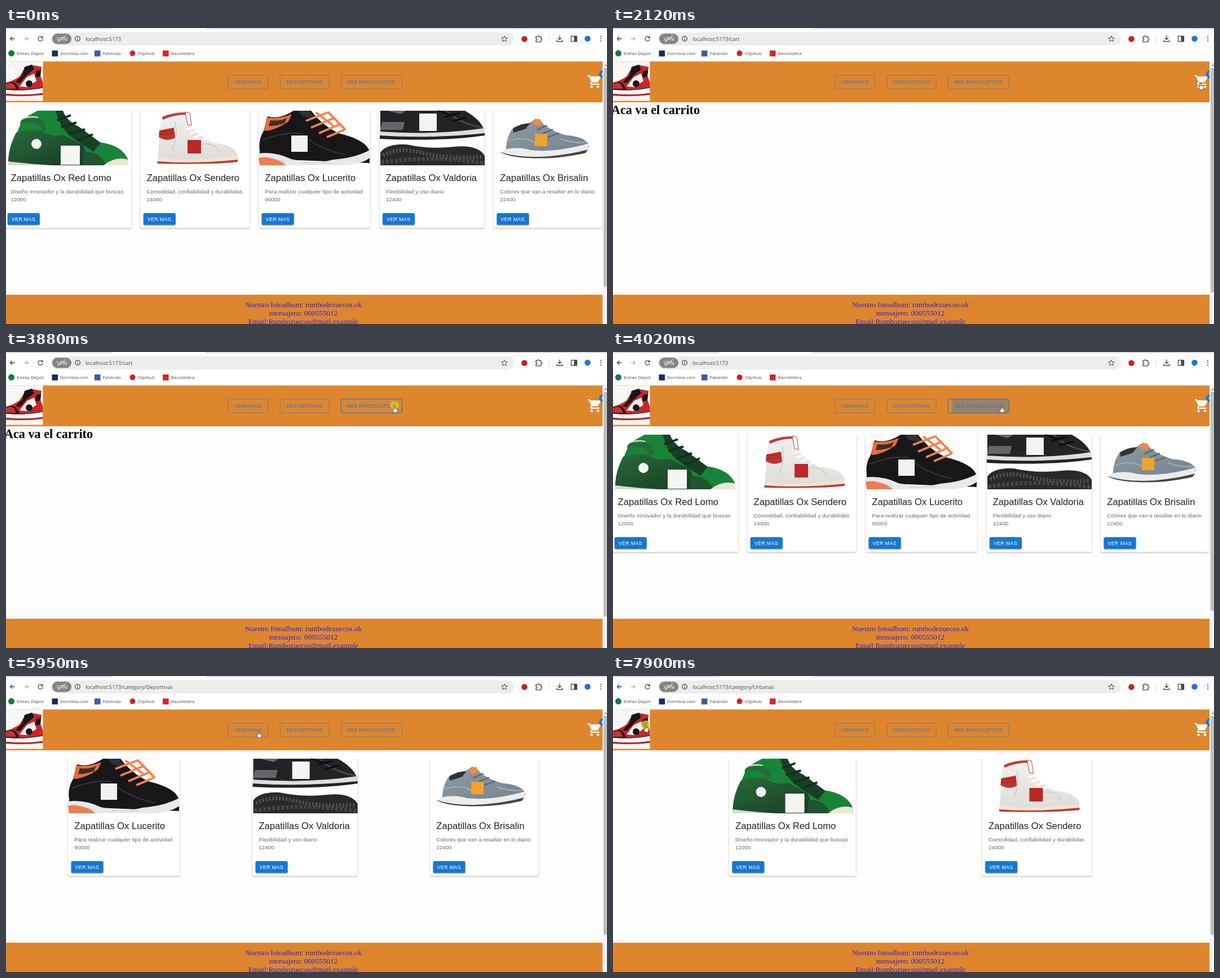
An HTML page that plays this animation: 1066 by 526 pixels, repeating every 8 s.

```html
<!DOCTYPE html>
<html lang="es">
<head>
<meta charset="utf-8">
<title>Tienda de zapatillas</title>
<style>
html, body { margin: 0; width: 100%; height: 100%; overflow: hidden; background: #fff; }
svg { display: block; width: 100vw; height: 100vh; }
text { white-space: pre; }
.chrome { font-family: "Open Sans", "Noto Sans", sans-serif; fill: #45484c; }
.url { font-size: 9.4px; }
.marks { font-size: 8px; }
.page { font-family: "Liberation Sans", Arial, sans-serif; }
.serif { font-family: "Liberation Serif", Times, serif; }
.title { font-size: 16.64px; fill: #212121; }
.body { font-size: 9.7px; letter-spacing: .0107em; fill: #666; }
.more { font-size: 9px; letter-spacing: .0286em; fill: #fff; }
.nav { font-size: 9.7px; letter-spacing: .0286em; fill: #2677df; }
.card { filter: drop-shadow(0 1px .8px rgba(0,0,0,.32)); }
.raised { filter: drop-shadow(0 1px 1px rgba(0,0,0,.35)); }
.line { fill: none; stroke: #45484c; stroke-width: 1.3; }
</style>
</head>
<body>
<svg viewBox="0 0 1066 526" preserveAspectRatio="none">
  <defs>
    <clipPath id="photo"><rect x="-3" y="146.500" width="1070" height="97.500"/></clipPath>
    <clipPath id="view"><rect y="59" width="1058.500" height="467"/></clipPath>
    <clipPath id="logoBox"><rect y="59.500" width="65.500" height="70"/></clipPath>
    <pattern id="checker" width="6" height="6" patternUnits="userSpaceOnUse">
      <rect width="6" height="6" fill="#fff"/><path d="M0 0h3v3H0zM3 3h3v3H3z" fill="#f1f1f1"/>
    </pattern>
    <linearGradient id="suede" x2="1" y2="1"><stop stop-color="#2b6a3d"/><stop offset="1" stop-color="#153b22"/></linearGradient>
    <linearGradient id="leather" x2="0" y2="1"><stop stop-color="#f2f1ef"/><stop offset="1" stop-color="#dedcd8"/></linearGradient>
    <linearGradient id="mesh" x2="1" y2="1"><stop stop-color="#8d9aa3"/><stop offset="1" stop-color="#74838e"/></linearGradient>

    <g id="shoe0">
      <path d="M29 163Q42 154 56 147H101Q107 165 130 176L165 203Q207 208 217 235V244H4Q3 214 19 187Z" fill="#188437"/>
      <path d="M18 186Q42 179 63 183Q80 195 102 190L137 208L150 244H4Q3 214 18 186Z" fill="url(#suede)"/>
      <path d="M88 147H101Q107 165 130 176L168 204L155 220L119 196Q96 180 88 147Z" fill="#183f25"/>
      <path d="M138 221Q165 217 178 244H136Z" fill="#20552f"/>
      <path d="M28 163L55 160L68 166L72 181L64 183Q61 164 24 170Z" fill="#246b38"/>
      <path d="M28 161Q44 156 57 159" fill="none" stroke="#d7e3d9" stroke-width="2"/>
      <path d="M91 164l24-9M98 176l27-8M112 189l28-9M126 200l28-11" stroke="#102f1c" stroke-width="4"/>
      <path d="M173 244Q194 227 217 234V244Z" fill="#ece6d2"/>
      <path d="M4 237Q45 242 82 244H3Z" fill="#ddd9c9"/>
      <circle cx="54" cy="206" r="9" fill="#f3f5f3"/>
      <rect x="97" y="209" width="34" height="34" fill="#f5f5f2"/>
    </g>
    <g id="shoe1">
      <path d="M275 159Q298 149 324 149L331 178Q350 196 366 204Q404 207 411 225L409 238H269L272 195Z" fill="url(#leather)"/>
      <path d="M272 182L298 177L300 195Q286 203 271 194Z" fill="#bd342f"/>
      <path d="M273 185l25-3M272 190l27-3" stroke="#8e211e"/>
      <path d="M277 158Q298 149 319 150L320 154Q298 154 278 163Z" fill="#c63b32"/>
      <path d="M318 149L326 151L329 173L322 172Z" fill="#fff" stroke="#c7403a"/>
      <path d="M319 181l12-5M325 188l16-6M333 195l17-7M343 201l18-6" stroke="#fff" stroke-width="2.500"/>
      <path d="M300 167Q306 195 294 216M348 207Q371 202 379 222" fill="none" stroke="#bdb9b5"/>
      <path d="M269 230Q336 239 411 226V236Q370 242 269 239Z" fill="#efe4d4"/>
      <path d="M268 237Q335 242 411 234V238Q370 243 269 241Z" fill="#bd3b31"/>
      <rect x="322" y="199" width="24" height="24" fill="#bc2825"/>
    </g>
    <g id="shoe2">
      <path d="M450 219Q447 199 457 183L464 157Q486 163 510 147H541Q561 173 590 187Q640 199 645 220V240L449 232Z" fill="#171719"/>
      <path d="M462 159Q485 162 507 153L501 166Q479 182 458 183Z" fill="#e96b38"/>
      <path d="M469 164Q485 166 498 160L494 169Q478 175 466 174Z" fill="#38302f"/>
      <path d="M518 147H538L549 161L526 157Z" fill="#303136"/>
      <path d="M532 165l39-15M541 177l41-17M555 187l40-17M569 194l31-13M550 150l31 24M571 149l31 32" stroke="#f5824e" stroke-width="4" fill="none"/>
      <path d="M455 199Q492 185 522 187Q557 217 602 225" fill="none" stroke="#343439" stroke-width="2"/>
      <path d="M448 223Q476 219 506 233Q548 243 580 234Q619 231 645 217V231Q632 241 602 244H452Z" fill="#e8e8e9"/>
      <path d="M448 231Q473 225 497 244H450Z" fill="#ef7c50"/>
      <path d="M459 229l38 9M527 240l46-1" stroke="#c5c6c9"/>
      <rect x="506" y="191" width="29" height="29" fill="#f2f2f2"/>
    </g>
    <g id="shoe3">
      <path d="M664 147H814Q842 163 848 181V190Q760 194 664 187Z" fill="#232326"/>
      <path d="M677 147L700 153L710 147ZM667 167h40l-3 14h-40z" fill="#64656b"/>
      <path d="M781 147Q804 170 846 177" fill="none" stroke="#48484c" stroke-width="3"/>
      <path d="M766 147l29 9M777 158l28-7M790 166l27-7" stroke="#0d0d0f" stroke-width="3"/>
      <path d="M663 184Q760 191 848 178V188Q774 197 663 192Z" fill="#dededf"/>
      <path d="M663 191Q750 197 849 187V191Q775 202 663 197Z" fill="#232325"/>
      <path d="M664 221Q676 205 711 207Q752 216 795 211Q837 207 849 227V244H664Z" fill="#29292b"/>
      <path d="M669 226Q698 211 739 222T846 229" fill="none" stroke="#505053" stroke-width="7" stroke-dasharray="3 3"/>
      <path d="M666 239Q752 226 848 240" fill="none" stroke="#464649" stroke-width="7" stroke-dasharray="5 3"/>
      <rect x="733" y="152" width="31" height="31" fill="#f4f4f4"/>
    </g>
    <g id="shoe4">
      <path d="M897 181Q903 171 916 177L940 161L951 169Q969 184 991 190Q1033 194 1034 211L1018 221L886 224Q887 195 897 181Z" fill="url(#mesh)"/>
      <path d="M899 179Q913 169 930 169L922 179Q908 184 900 186Z" fill="#303338"/>
      <path d="M933 167L946 161L953 170L941 174Z" fill="#ef8d37"/>
      <path d="M942 181l18-8M951 188l19-8M961 194l20-7" stroke="#56636c" stroke-width="2"/>
      <path d="M891 201Q924 190 944 208M984 197Q1009 206 1029 203" fill="none" stroke="#a3afb6" stroke-width="2"/>
      <path d="M883 216Q909 210 930 217Q974 222 1034 205L1031 218Q977 231 912 229L877 222Z" fill="#ececec"/>
      <path d="M876 220Q901 229 941 229Q987 228 1032 216L1028 222Q978 234 926 231Q889 229 876 220Z" fill="#44464a"/>
      <rect x="938" y="188" width="22" height="22" fill="#f2a12d"/>
    </g>

    <g id="arrow"><path d="M0 0V10L2.400 7.800L4 11.300L5.600 10.500L4 7.200H7Z" fill="#fff" stroke="#111" stroke-width=".8"/></g>
    <g id="hand"><path d="M-1 1Q0-1 1 1V5L5 6Q6 7 5.500 10L4 13H-1L-4 8Q-3 6-1 8Z" fill="#fff" stroke="#222" stroke-width=".8"/></g>
  </defs>

  <rect width="1066" height="526" fill="#fefefe"/>

  <!-- browser bars -->
  <g class="chrome">
    <rect width="1066" height="59" fill="#fff"/>
    <path d="M0 0H188V2H0ZM354 0H1066V2H354Z" fill="#dcdee2"/>
    <rect x="80" y="7.500" width="821" height="23.500" rx="11.700" fill="#ededee"/>
    <path class="line" d="M15.500 19H7.500M11 15.500L7.500 19L11 22.500"/>
    <path class="line" d="M31.500 19H39.500M36 15.500L39.500 19L36 22.500" style="stroke:#b5b7ba"/>
    <path class="line" d="M64.500 17A4 4 0 1 0 65 20M65 14.500V17.500H62"/>
    <rect x="82" y="10" width="34" height="18.500" rx="9.200" fill="#858585"/>
    <text x="90" y="23" font-size="9.500" style="fill:#fff">VPN</text>
    <path d="M92 25L106 13" stroke="#fff"/>
    <circle class="line" cx="127" cy="19" r="4.300"/><path class="line" d="M127 18.500V21.500M127 16V17.200"/>
    <text id="url" class="url" x="141" y="23"></text>
    <path class="line" style="stroke-width:1" d="M884 14l1.500 3.500 3.800.300-2.900 2.500.900 3.700-3.300-2-3.300 2 .900-3.700-2.900-2.500 3.800-.300Z"/>
    <circle cx="919.500" cy="19.500" r="5.300" fill="#c5221f"/>
    <path class="line" d="M940 15.500h2.500a1.700 1.700 0 0 1 3.400 0h3v3a1.700 1.700 0 0 1 0 3.400v2.800h-8.900v-2.800a1.700 1.700 0 0 0 0-3.400Z"/>
    <path d="M963.500 14V25" stroke="#dadcdf"/>
    <path class="line" d="M982 13.500V20.500M978.800 17.500L982 20.700L985.200 17.500M977 21V24H987V21"/>
    <rect class="line" x="1002.500" y="14.500" width="10" height="9.500"/><rect x="1007.500" y="14.500" width="5" height="9.500"/>
    <circle cx="1031.500" cy="19" r="5.300" fill="#1a73e8"/>
    <g><circle cx="1055" cy="15" r="1.100"/><circle cx="1055" cy="19" r="1.100"/><circle cx="1055" cy="23" r="1.100"/></g>
    <g class="marks">
      <circle cx="9.500" cy="45" r="5.500" fill="#157a3c"/><text x="19" y="48">Extras Depot</text>
      <rect x="81.500" y="40" width="10.500" height="10.500" fill="#17296f"/><text x="96" y="48">Dormiva.com</text>
      <rect x="157" y="40" width="10.500" height="10.500" fill="#3f5ba9"/><text x="171.500" y="48">Palvindo</text>
      <circle cx="224.500" cy="45" r="5" fill="#d5201b"/><text x="234" y="48">ClipNub</text>
      <rect x="278" y="40" width="10.500" height="10.500" rx="1" fill="#d8251d"/><text x="293" y="48">BazoVelera</text>
    </g>
  </g>

  <!-- page -->
  <g clip-path="url(#view)">
    <path d="M0 59.500H1058.500V132H0ZM0 474H1058.500V526H0Z" fill="#de862e"/>
    <g clip-path="url(#logoBox)">
      <rect y="59" width="66" height="71" fill="url(#checker)"/>
      <path d="M34 70L47 66L63 69L61 85L66 98V110L-2 113V98Q13 94 24 86Z" fill="#c9262a"/>
      <path d="M33 69L46 65L50 73L36 85L24 98L17 96L29 84ZM53 77L62 74L61 86L52 88ZM-2 98Q11 94 17 98L24 109H-2Z" fill="#171717"/>
      <path d="M37 87L50 81L54 94L38 105L24 104Z" fill="#f7f3ef"/>
      <path d="M0 99Q9 95 14 100L18 108H0Z" fill="#d02e30"/>
      <circle cx="41" cy="99" r="6" fill="#171717"/>
      <path d="M-2 109Q30 113 66 106V116Q32 121-2 117Z" fill="#fff" stroke="#222"/>
      <path d="M-2 117Q32 121 66 116V119Q30 123-2 120Z" fill="#c9262a"/>
    </g>
    <g id="nav" class="page"></g>
    <path transform="translate(1030.500 81.500) scale(1.150)" fill="#fff" d="M7 18c-1.100 0-1.990.9-1.990 2S5.900 22 7 22s2-.9 2-2-.9-2-2-2zM1 2v2h2l3.600 7.590-1.350 2.450c-.16.28-.25.61-.25.96 0 1.100.9 2 2 2h12v-2H7.420c-.14 0-.25-.11-.25-.25l.03-.12.9-1.630h7.450c.75 0 1.410-.41 1.750-1.030l3.580-6.490c.08-.14.12-.31.12-.48 0-.55-.45-1-1-1H5.210l-.94-2H1zm16 16c-1.100 0-1.990.9-1.990 2s.89 2 1.990 2 2-.9 2-2-.9-2-2-2z"/>
    <circle cx="1058.800" cy="82" r="7" fill="#1976d2"/>
    <text class="page" x="1056.500" y="85" font-size="8.300" fill="#fff">0</text>
    <g id="cards" class="page"></g>
    <text id="cartTitle" class="serif" x="-3" y="153" font-size="22.200" font-weight="700">Aca va el carrito</text>
    <g class="serif" font-size="13.300" fill="#2b1fe6" text-anchor="middle">
      <text x="527.500" y="496">Nuestro fotoalbum: rumbodezuecos.ok</text>
      <text x="527.500" y="511">mensajero: 000555012</text>
      <text x="527.500" y="526">Email:Rumbozuecos@mail.example</text>
    </g>
  </g>

  <rect x="1058.500" y="59" width="7.500" height="467" fill="#f3f3f3"/>
  <path d="M1061.500 67.500L1064 64.500L1066 67.500Z" fill="#8a8a8a"/>
  <rect id="thumb" x="1060" y="71" width="6" fill="#bfbfbf"/>

  <circle id="spot" r="8" fill="#e6c81e" opacity=".78"/>
  <use id="cursor"/>
</svg>
<script>
const LOOP = 8000;
const $ = id => document.getElementById(id);

const products = [
  { x: -2.8, w: 225, name: 'Ox Red Lomo', about: 'Diseño innovador y la durabilidad que buscas', price: 12000 },
  { x: 238.2, w: 194, name: 'Ox Sendero', about: 'Comodidad, confiabilidad y durabilidas', price: 24000 },
  { x: 448, w: 198, name: 'Ox Lucerito', about: 'Para realizar cualquier tipo de actividad', price: 90000 },
  { x: 662.4, w: 186.5, name: 'Ox Valdoria', about: 'Flexibilidad y uso diario', price: 12400 },
  { x: 865, w: 192.5, name: 'Ox Brisalin', about: 'Colores que van a resaltar en lo diario', price: 22400 }
];

const home = Object.fromEntries(products.map((p, i) => [i, p.x]));
const routes = [
  { at: 0, path: '', cards: home },
  { at: 2120, path: '/cart', cards: {}, cart: true },
  { at: 3950, path: '', cards: home },
  { at: 5300, path: '/category/Deportivas', cards: { 2: 110, 3: 437, 4: 752 } },
  { at: 6550, path: '/category/Urbanas', cards: { 0: 205.7, 1: 654.7 } }
];

const buttons = [
  { x: 394, w: 71, label: 'URBANAS', hover: [6020, 6780], click: 6420 },
  { x: 486.4, w: 86.6, label: 'DEPORTIVAS', hover: [4950, 5720], click: 5170 },
  { x: 594.4, w: 108, label: 'MIS PRODUCTOS', hover: [3550, 4660], click: 3880 }
];

// [start, end] of the click highlight
const clicks = [[1850, 2120], [3880, 4010], [5170, 5300], [6420, 6550], [7900, LOOP]];

// [time, x, y] of the pointer tip
const track = [
  [250, 1030, 482], [380, 1029, 360], [700, 1029, 360], [840, 1016, 168],
  [1100, 1016, 167], [1310, 1032, 97], [1650, 1042, 97], [2600, 1042, 97],
  [2780, 820, 106], [2990, 820, 106], [3050, 778, 105], [3820, 689, 95],
  [4640, 689, 95], [5170, 547.5, 100], [5560, 547.5, 100], [5950, 448, 97],
  [6350, 440, 95], [6700, 440, 95], [7180, 198, 89], [7700, 58, 87]
];

$('cards').innerHTML = products.map((p, i) => `<g>
  <rect class="card" x="${p.x}" y="147" width="${p.w}" height="208.5" rx="2.5" fill="#fff"/>
  <g clip-path="url(#photo)"><use href="#shoe${i}"/></g>
  <text class="title" x="${p.x + 11.3}" y="272">Zapatillas ${p.name}</text>
  <text class="body" x="${p.x + 11.3}" y="294">${p.about}</text>
  <text class="body" x="${p.x + 11.3}" y="308">${p.price}</text>
  <rect class="raised" x="${p.x + 5.6}" y="329" width="57" height="21" rx="2.8" fill="#1976d2"/>
  <text class="more" x="${p.x + 12.6}" y="342.8">VER MAS</text></g>`).join('');

$('nav').innerHTML = buttons.map((b, i) => `<g>
  <clipPath id="nav${i}"><rect x="${b.x}" y="83.5" width="${b.w}" height="25" rx="2.5"/></clipPath>
  <circle r="0" fill="#1976d2" clip-path="url(#nav${i})"/>
  <rect x="${b.x}" y="83.5" width="${b.w}" height="25" rx="2.5" fill="#1976d2" stroke="#1976d2"/>
  <text class="nav" x="${b.x + 10.8}" y="99.3">${b.label}</text></g>`).join('');

const cardNodes = [...$('cards').children];
const navNodes = [...$('nav').children];
const clamp = v => Math.max(0, Math.min(1, v));

function pointerAt(t) {
  const next = track.findIndex(k => k[0] > t);
  if (next < 0) return track.at(-1).slice(1);
  if (next === 0) return [1030, 560];
  const [a, b] = [track[next - 1], track[next]];
  const f = (t - a[0]) / (b[0] - a[0]);
  return [a[1] + (b[1] - a[1]) * f, a[2] + (b[2] - a[2]) * f];
}

function overLink(x, y) {
  return y > 60 && y < 108 &&
    (x < 66 || x > 1028 || buttons.some(b => x > b.x && x < b.x + b.w));
}

function showRoute(route) {
  $('url').textContent = 'localhost:5173' + route.path;
  $('cartTitle').style.display = route.cart ? '' : 'none';
  $('thumb').setAttribute('height', route.cart ? 399 : 389);
  cardNodes.forEach((node, i) => {
    const shown = i in route.cards;
    node.style.display = shown ? '' : 'none';
    if (shown) node.setAttribute('transform', `translate(${route.cards[i] - products[i].x})`);
  });
}

function drawButton(b, i, t) {
  const [, ripple, frame] = navNodes[i].children;
  const hover = clamp((t - b.hover[0]) / 250) * clamp((b.hover[1] - t) / 150);
  frame.setAttribute('fill-opacity', .04 * hover);
  frame.setAttribute('stroke-opacity', .5 + .5 * hover);
  const age = t - b.click;
  const [x, y] = pointerAt(b.click);
  ripple.setAttribute('cx', x);
  ripple.setAttribute('cy', y);
  ripple.setAttribute('r', Math.min(130, Math.max(0, age * .62)));
  ripple.setAttribute('opacity', age < 0 ? 0 : .3 * clamp((640 - age) / 400));
}

let current;
function draw(now) {
  const t = now % LOOP;
  const route = routes.findLast(r => r.at <= t);
  if (route !== current) showRoute(current = route);
  buttons.forEach((b, i) => drawButton(b, i, t));

  const [x, y] = pointerAt(t);
  const place = `translate(${x} ${y})`;
  $('cursor').setAttribute('href', overLink(x, y) ? '#hand' : '#arrow');
  $('cursor').setAttribute('transform', place);
  $('spot').setAttribute('transform', place);
  $('spot').style.display = clicks.some(([from, to]) => t >= from && t < to) ? '' : 'none';
  requestAnimationFrame(draw);
}
draw(performance.now());
</script>
</body>
</html>
```
